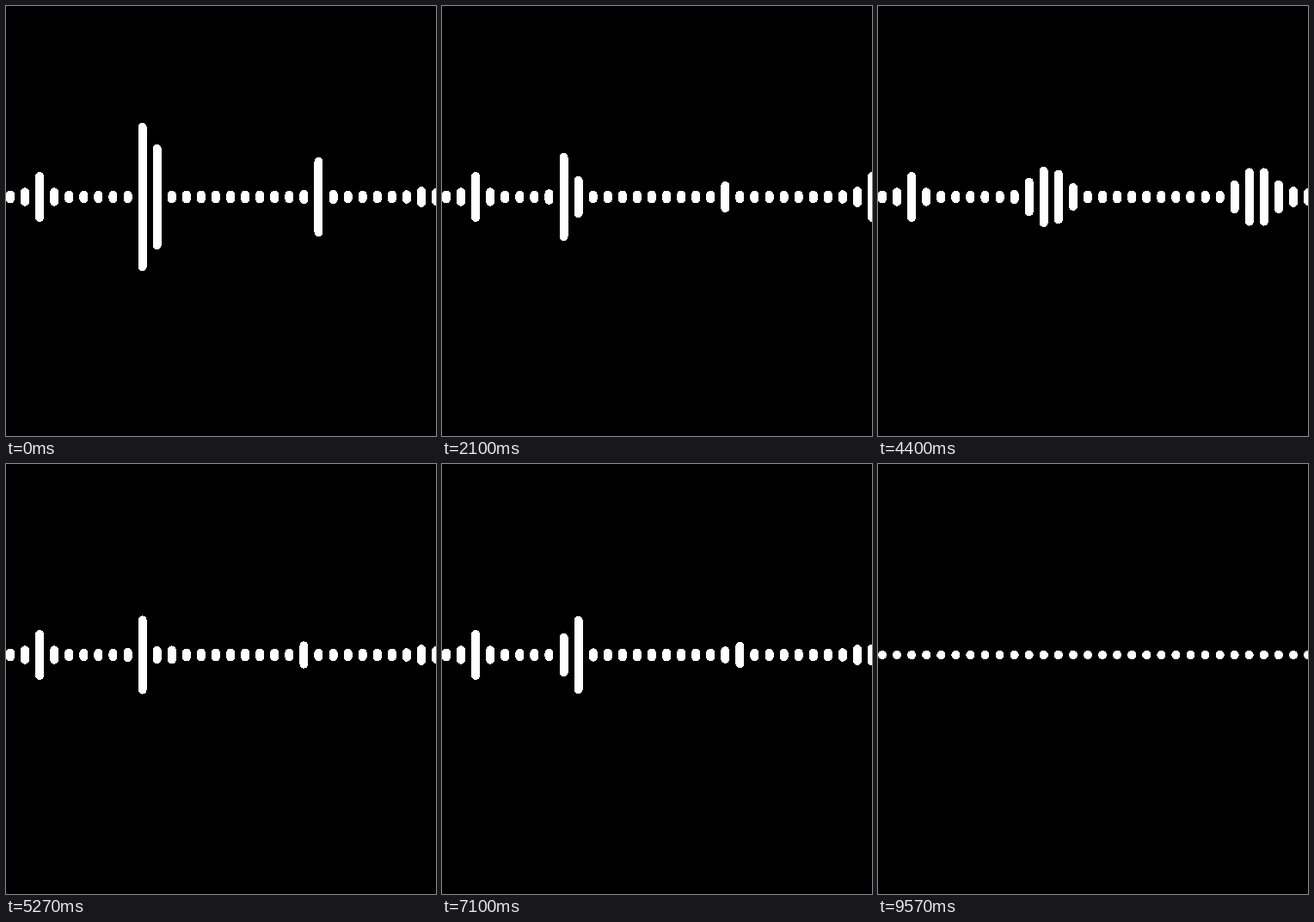
Write an HTML page that moves like this. It is 500 px wide and 500 px high and loops after 9.66 s.

```html
<!DOCTYPE html>
<html lang="en">
<head>
<meta charset="utf-8">
<title>Audio bars</title>
<style>
  html, body { margin: 0; width: 100%; height: 100%; overflow: hidden; background: #000; }
  svg { display: block; width: 500px; height: 500px; }
  rect { fill: #fff; shape-rendering: crispEdges; }
</style>
</head>
<body>
<svg id="stage" viewBox="0 0 500 500"></svg>
<script>
const LOOP = 9660, SILENCE = 9570, BARS = 30, PITCH = 17.07, MID = 222, DOT = 5.2;

const bars = Array.from({ length: BARS }, (_, i) => {
  const bar = document.createElementNS("http://www.w3.org/2000/svg", "rect");
  bar.setAttribute("x", i * PITCH);
  bar.setAttribute("width", 10);
  bar.setAttribute("rx", 5);
  return document.getElementById("stage").appendChild(bar);
});

const bump = (i, centre, peak, sharpness) => peak * Math.exp(-sharpness * (i - centre) ** 2);

// Steady sound: a low murmur, a bass bar and a little treble.
const rest = i => Math.max(7.4, bump(i, 2, 29, 1), bump(i, 28.2, 12, 0.3));

// A note sounds at a bar, with two overtones further up.
function note(at, bar, peak, { over = peak * 0.35, gap = 10.9, sharpness = 1.7 } = {}) {
  const level = i => Math.max(
    bump(i, bar, peak, sharpness),
    bump(i, bar + gap, over, sharpness),
    bump(i, bar + 21.2, peak * 0.62, sharpness));
  return { at, level };
}

const melody = [
  note(0, 9.4, 113, { over: 46, gap: 11.6 }),
  note(530, 9, 106),
  note(1130, 8.95, 96, { over: 28 }),
  note(1600, 9, 84),
  note(2400, 8, 121),
  note(3130, 8, 67.5, { over: 19 }),
  note(3600, 8, 91),
  note(4400, 11.3, 36, { over: 36, gap: 14.2, sharpness: 0.28 }),
  note(4800, 11, 77),
  note(5470, 9, 91),
  note(6130, 8.2, 55, { over: 25 }),
  note(6600, 8, 121),
  note(7330, 9, 88),
  note(7930, 8.5, 29, { over: 13, gap: 14, sharpness: 0.28 }),
  note(8530, 9, 106),
  note(9270, 9, 136),
  note(SILENCE, 9, 0)
];

// Five pictures are spread unevenly over every 200 ms.
function snap(time) {
  const beat = Math.floor(time / 200) * 200;
  return beat + [170, 130, 100, 70, 0].find(step => step <= time - beat);
}

// Each note dies away while the next one rises.
function halfHeight(i, time) {
  if (time >= SILENCE) return DOT;
  const next = melody.findIndex(({ at }) => at > time);
  const a = melody[next - 1], b = melody[next];
  const u = (time - a.at) / (b.at - a.at);
  const mix = u * u * (3 - 2 * u);
  const dip = 1 - 0.45 * Math.sin(Math.PI * u);
  const level = dip * (a.level(i) * (1 - mix) + b.level(i) * mix);
  const fade = Math.min(1, (SILENCE - time) / 300);
  return DOT + fade * (Math.max(rest(i), level) - DOT);
}

function draw() {
  const time = snap(performance.now() % LOOP);
  bars.forEach((bar, i) => {
    const half = halfHeight(i, time);
    bar.setAttribute("y", MID - half);
    bar.setAttribute("height", 2 * half);
  });
  requestAnimationFrame(draw);
}
draw();
</script>
</body>
</html>
```
